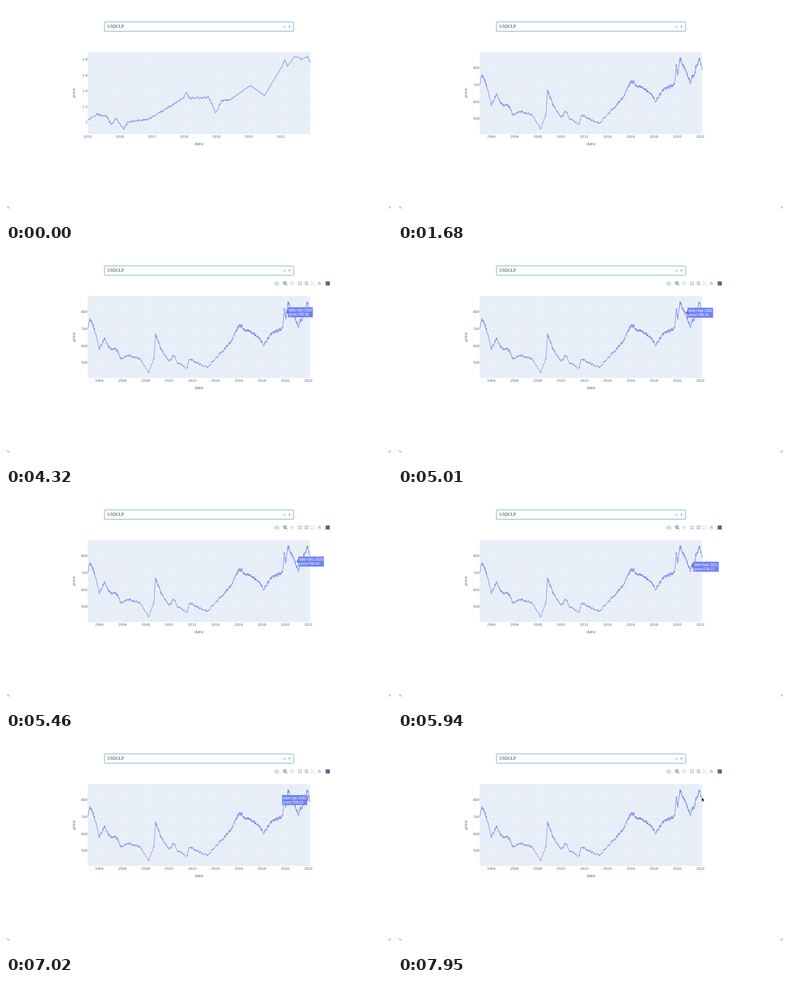
Write an HTML page with a canvas that moves like this. It is 720 by 405 pixels and loops after 8 s.

```html
<!DOCTYPE html>
<html lang="en">
<head>
<meta charset="utf-8">
<title>Price chart</title>
<style>
  html, body { margin: 0; width: 100%; height: 100%; overflow: hidden; background: #fff; }
  canvas { display: block; width: 720px; height: 405px; }
</style>
</head>
<body>
<canvas id="stage"></canvas>
<script>
const LOOP = 8000, STEP = 30;
const CHART_SWAP = 1680, POINTER_IN = 2250, HOVER_IN = 3060, HOVER_OUT = 7290;
const PLOT = { x: 152.5, y: 86.5, w: 415, h: 153.5 };
const LINE = '#7186ee', INK = '#4a5a78', GRID = '#f8fafd', PALE = '#c9cdd5';
const TIP = '#6f83f3', TIP_FONT = '6.5px "Liberation Sans", sans-serif';
const MONTHS = 'Jan Feb Mar Apr May Jun Jul Aug Sep Oct Nov Dec'.split(' ');

const canvas = document.getElementById('stage');
const ctx = canvas.getContext('2d');
const ratio = window.devicePixelRatio || 1;
canvas.width = 720 * ratio;
canvas.height = 405 * ratio;

const lerp = (a, b, k) => a + (b - a) * k;

// Seeded noise in -1..1: rough per step, or smoothed between whole numbers.
function hash(n) {
  const s = Math.sin(n * 127.1 + 11.7) * 43758.5453;
  return (s - Math.floor(s)) * 2 - 1;
}
function smooth(x) {
  const i = Math.floor(x);
  return lerp(hash(i), hash(i + 1), x - i);
}

// Joins turning points with a jagged walk; sections past `calmFrom` stay straight.
function series(turns, step, jitter, calmFrom = Infinity) {
  const points = [];
  for (let i = 1; i < turns.length; i++) {
    const [x0, y0] = turns[i - 1], [x1, y1] = turns[i];
    points.push([x0, y0]);
    if (x0 >= calmFrom) continue;
    for (let x = x0 + step; x < x1; x += step) {
      const y = lerp(y0, y1, (x - x0) / (x1 - x0));
      points.push([x, Math.max(94, Math.min(233, y + jitter(x, y)))]);
    }
  }
  points.push(turns[turns.length - 1]);
  return points;
}

const shortTurns = [
  [152.5, 214], [170, 203], [188, 207], [196, 222], [206, 211], [219, 231], [228, 217],
  [265, 213], [303, 190], [332, 171], [337, 162], [341, 173], [378, 171], [391, 200],
  [402, 178], [419, 175], [456, 149], [482, 168], [515, 113], [520, 100], [525, 113],
  [538, 95], [549, 97], [550, 101], [563, 94.5], [567.5, 106]
];
const longTurns = [
  [153, 146], [156, 131], [165, 146], [174, 186], [183, 166], [196, 187], [206, 186],
  [215, 205], [229, 198], [250, 204], [266, 230], [276, 204], [279, 158], [291, 189],
  [304, 209], [313, 197], [320, 211], [338, 222], [342, 204], [357, 212], [376, 220],
  [400, 194], [420, 172], [434, 142], [470, 162], [481, 180], [495, 155], [516, 147],
  [519, 111], [522, 128], [526, 97], [545, 145], [563, 98], [567, 118]
];

const priceY = price => 116 + (800 - price) * 0.317;
const ticks = (n, make) => Array.from({ length: n }, (_, i) => make(i));

const shortChart = {
  points: series(shortTurns, 0.6, x => smooth(x) * 2.4, 419),
  width: 1.05,
  xs: ticks(7, i => [152.5 + i * 60, 2015 + i]),
  ys: ticks(5, i => [218 - i * 29.5, +(1 + i * 0.2).toFixed(1)])
};
// Higher prices swing more.
const swing = y => 1.2 + (230 - y) * 0.028;
const longChart = {
  points: series(longTurns, 0.3, (x, y) => swing(y) * (smooth(x / 1.6) + 0.75 * hash(x))),
  width: 0.95,
  xs: ticks(10, i => [174 + i * 43.35, 2004 + i * 2]),
  ys: ticks(4, i => [priceY(500 + i * 100), 500 + i * 100])
};

// Each move ends at a pointer position and a hovered point, then rests.
const entry = { x: 300, y: 60, at: 421, price: 660 };
const moves = [
  { from: 2250, to: 3090, x: 418, y: 155, at: 423.6, price: 672.19 },
  { from: 3390, to: 3840, x: 429, y: 140, at: 432, price: 722 },
  { from: 3990, to: 4320, x: 525, y: 115, at: 521.2, price: 797.96 },
  { from: 4320, to: 4770, x: 537, y: 112, at: 533, price: 815 },
  { from: 4830, to: 5010, x: 540, y: 117, at: 535.5, price: 795.2 },
  { from: 5010, to: 5940, x: 550, y: 133, at: 546.4, price: 736.17 },
  { from: 6300, to: 7020, x: 563, y: 112, at: 565, price: 799.23 },
  { from: 7110, to: 7470, x: 567, y: 102, at: 566, price: 806 },
  { from: 7620, to: 7950, x: 567, y: 112, at: 566, price: 806 }
];

function pointerAt(time) {
  let state = entry;
  for (const move of moves) {
    if (time < move.from) break;
    const k = Math.min(1, (time - move.from) / (move.to - move.from));
    const mix = key => lerp(state[key], move[key], k);
    state = { x: mix('x'), y: mix('y'), at: mix('at'), price: mix('price') };
  }
  return state;
}

function text(str, x, y, font, color, align = 'left') {
  ctx.font = font;
  ctx.fillStyle = color;
  ctx.textAlign = align;
  ctx.fillText(str, x, y);
}

function path(points) {
  ctx.beginPath();
  for (const [x, y] of points) ctx.lineTo(x, y);
}

function stroke(points, color, width) {
  path(points);
  ctx.strokeStyle = color;
  ctx.lineWidth = width;
  ctx.stroke();
}

function fill(points, color) {
  path(points);
  ctx.fillStyle = color;
  ctx.fill();
}

function box(x, y, w, h, color) {
  ctx.fillStyle = color;
  ctx.fillRect(x, y, w, h);
}

function disc(x, y, r, color) {
  ctx.beginPath();
  ctx.arc(x, y, r, 0, 7);
  ctx.fillStyle = color;
  ctx.fill();
}

function at(x, y, turn, paint) {
  ctx.save();
  ctx.translate(x, y);
  ctx.rotate(turn * Math.PI / 2);
  paint();
  ctx.restore();
}

function drawDropdown() {
  ctx.beginPath();
  ctx.roundRect(183.5, 29.8, 353, 17.6, 2);
  for (const [color, width] of [['#dcebf8', 2.6], ['#8db9e0', 0.9]]) {
    ctx.strokeStyle = color;
    ctx.lineWidth = width;
    ctx.stroke();
  }
  text('USDCLP', 189, 41.2, '8px "Liberation Serif", serif', '#333');
  stroke([[517.5, 37], [521.5, 41]], '#999', 0.8);
  stroke([[521.5, 37], [517.5, 41]], '#999', 0.8);
  fill([[526, 37.5], [531.2, 37.5], [528.6, 40.2]], '#999');
}

function drawCorners() {
  for (const [x, side] of [[3.5, 1], [716.5, -1]]) {
    stroke([[x, 375], [x, 378.5], [x + side * 3.5, 378.5]], '#777', 0.8);
  }
}

function drawChart({ points, width, xs, ys }) {
  const { x, y, w, h } = PLOT;
  const tickFont = '6.05px "DejaVu Sans", sans-serif';
  const titleFont = '7.1px "DejaVu Sans", sans-serif';
  box(x, y, w, h, '#e7eef7');
  for (const [tx, label] of xs) {
    stroke([[tx, y], [tx, y + h]], GRID, 0.7);
    text(label, tx, 247.1, tickFont, INK, 'center');
  }
  for (const [ty, label] of ys) {
    stroke([[x, ty], [x + w, ty]], GRID, 0.7);
    text(label, 152, ty + 2.2, tickFont, INK, 'right');
  }
  text('date', 360, 260.6, titleFont, INK, 'center');
  at(129.2, 163.2, -1, () => text('price', 0, 0, titleFont, INK, 'center'));
  ctx.lineJoin = 'round';
  stroke(points, LINE, width);
}

function drawToolbar() {
  const y = 62.7, active = '#7f899c';

  // Camera
  box(501, y - 2.2, 8, 5.6, PALE);
  box(503.2, y - 3.3, 3.6, 1.5, PALE);
  disc(505, y + 0.6, 1.9, '#fff');
  disc(505, y + 0.6, 1, PALE);

  // Magnifier
  disc(520.1, y - 0.7, 3.2, active);
  disc(520.1, y - 0.7, 2, '#fff');
  stroke([[522, y + 1.2], [524.3, y + 3.5]], active, 1.5);
  for (const turn of [0, 1]) {
    at(520.1, y - 0.7, turn, () => stroke([[-1.3, 0], [1.3, 0]], active, 0.8));
  }

  // Pan and autoscale arrows
  for (const turn of [0, 1, 2, 3]) {
    at(533, y, turn, () => {
      stroke([[0, 0], [4, 0]], PALE, 0.9);
      fill([[4.2, 0], [2.5, -1.5], [2.5, 1.5]], PALE);
    });
    at(572.5, y, turn, () => {
      stroke([[1, 1], [3.4, 3.4]], PALE, 1.1);
      stroke([[1.6, 3.5], [3.5, 3.5]], PALE, 0.8);
    });
  }

  // Zoom in and out
  for (const x of [548.6, 560.5]) {
    box(x - 3.6, y - 3.6, 7.2, 7.2, PALE);
    stroke([[x - 2.2, y], [x + 2.2, y]], '#fff', 1.1);
  }
  stroke([[548.6, y - 2.2], [548.6, y + 2.2]], '#fff', 1.1);

  // Home
  fill([[580.5, y + 0.3], [584.5, y - 3.6], [588.5, y + 0.3]], PALE);
  box(581.7, y, 5.6, 3.4, PALE);
  box(583.8, y + 1.2, 1.4, 2.2, '#fff');

  box(596.3, y - 3.8, 7.6, 7.6, '#52628a');
}

function drawTooltip(x, price) {
  const y = priceY(price);
  const date = 2004 + (x - 174) / 21.675;
  const year = Math.floor(date);
  const lines = [
    `date=${MONTHS[Math.floor((date - year) * 12)]} ${year}`,
    `price=${price.toFixed(2)}`
  ];
  ctx.font = TIP_FONT;
  const w = Math.max(...lines.map(s => ctx.measureText(s).width)) + 3.4;
  const flip = x + 4.5 + w > 608;
  const left = flip ? x - 3.3 - w : x + 4.5;
  const edge = flip ? left + w : left;
  box(left, y - 9.3, w, 18.8, TIP);
  fill([[x, y], [edge, y - 3], [edge, y + 3]], TIP);
  lines.forEach((s, i) => text(s, left + 1.7, y - 1.6 + i * 8.2, TIP_FONT, '#fff'));
}

function drawPointer(x, y) {
  if (x < 566 && y > PLOT.y) {
    stroke([[x, y - 3.2], [x, y + 3.2]], '#333', 0.8);
    stroke([[x - 1.5, y], [x + 1.5, y]], '#777', 0.6);
    return;
  }
  const arrow = [[0, 0], [0, 6.3], [1.4, 5], [2.5, 7.4], [3.5, 6.9], [2.5, 4.7], [4.4, 4.5], [0, 0]];
  at(x, y, 0, () => {
    stroke(arrow, '#fff', 0.9);
    fill(arrow, '#111');
  });
}

function draw(time) {
  ctx.setTransform(ratio, 0, 0, ratio, 0, 0);
  box(0, 0, 720, 405, '#fff');
  drawDropdown();
  drawCorners();
  drawChart(time < CHART_SWAP ? shortChart : longChart);
  if (time < POINTER_IN) return;
  drawToolbar();
  const pointer = pointerAt(time);
  if (time >= HOVER_IN && time < HOVER_OUT) drawTooltip(pointer.at, pointer.price);
  drawPointer(pointer.x, pointer.y);
}

const start = performance.now();
function tick() {
  const time = (performance.now() - start) % LOOP;
  draw(Math.floor(time / STEP) * STEP);
  requestAnimationFrame(tick);
}
tick();
</script>
</body>
</html>
```
